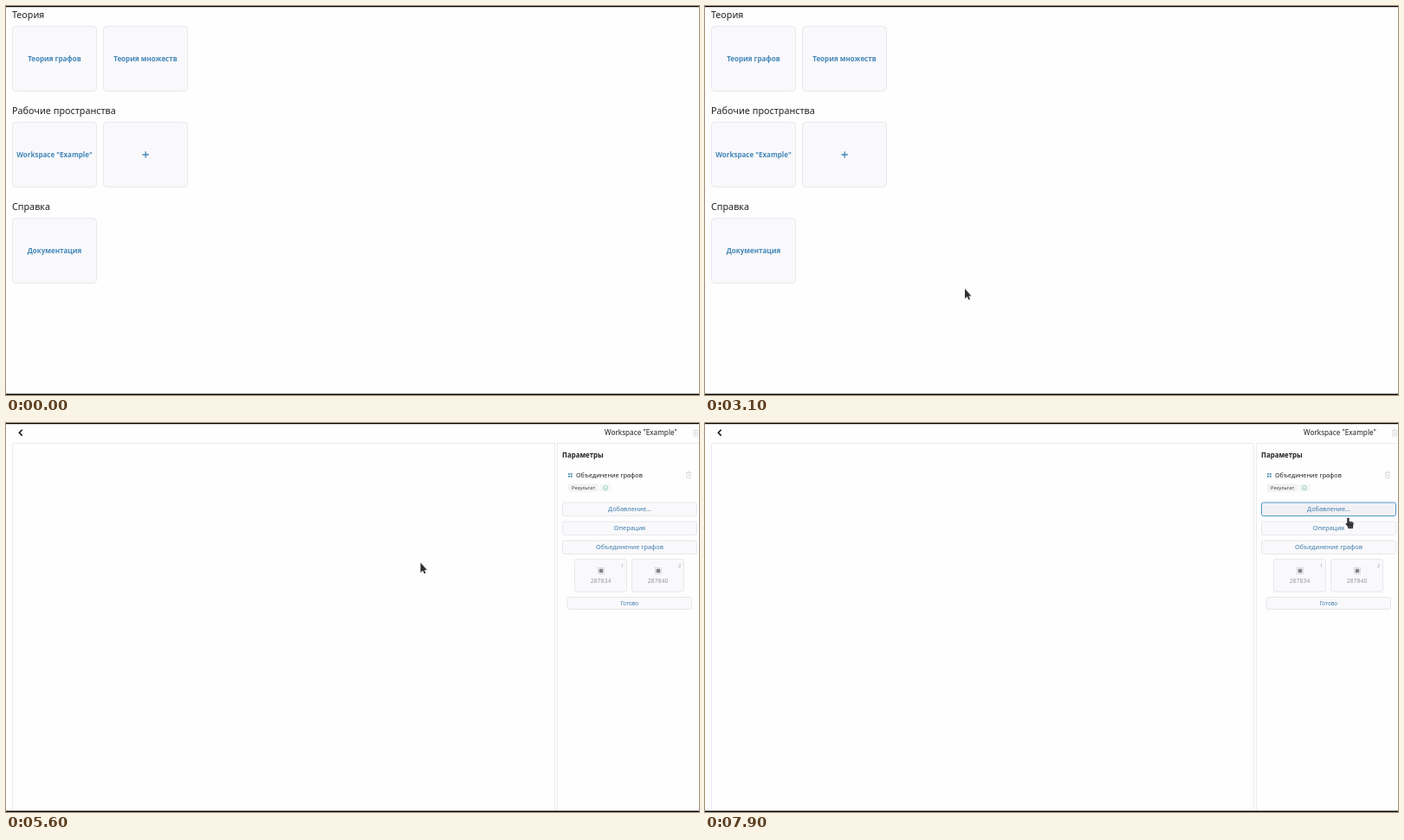
Write an HTML page that moves like this. It is 800 px wide and 450 px high and loops after 8 s.

```html
<!DOCTYPE html>
<html lang="ru">
<head>
<meta charset="utf-8">
<style>
  html, body { margin: 0; width: 100%; height: 100%; overflow: hidden; background: #fff; }
  svg { display: block; width: 800px; height: 450px; }
  text { font-family: "Noto Sans", "Open Sans", sans-serif; fill: #222; }
  .head { font-size: 10.75px; }
  .label { font-size: 8px; font-weight: 700; fill: #4587b8; text-anchor: middle; }
  .btn { font-size: 7.3px; fill: #3f7da9; text-anchor: middle; }
  .num { font-size: 6.9px; fill: #9b9b9f; text-anchor: middle; }
  .box { fill: #f9f9fc; stroke: #e8e8ed; }
  .box.hot { fill: #f1f0f5; stroke: #4f9ac6; }
  .line { fill: none; stroke: #ebebef; }
</style>
</head>
<body>
<svg viewBox="0 0 800 450">
  <rect width="800" height="450" fill="#fefefe"/>
  <g id="home"></g>
  <g id="work"></g>
  <rect width="800" height="1.2"/>
  <rect y="448.6" width="800" height="1.4"/>
  <g id="arrow">
    <path d="M.6 .8V12.2L3.2 9.8L5 13.6L7 12.7L5.2 9H8.6Z" fill="#000" opacity=".15"/>
    <path d="M0 0V11.4L2.6 9L4.3 12.8L6 12L4.3 8.4H7.4Z" fill="#303033" stroke="#fff" stroke-width=".7" paint-order="stroke"/>
  </g>
  <g id="hand">
    <path d="M-1.2 .6Q0 -.8 1.2 .6V4.2L5 5Q6.4 5.4 6.2 7L5.6 10.2V12.4H-.3V10.8L-2.8 7.6Q-3.4 5.6 -1.2 6.6Z" fill="#303033" stroke="#fff" stroke-width=".7" paint-order="stroke"/>
    <path d="M1.6 5.4V7M3.2 5.7V7.1M4.7 6V7.3M.3 10.8H5" stroke="#aaa" stroke-width=".4"/>
  </g>
</svg>
<script>
const LOOP = 8000, STEP = 100, SWITCH = 4700;
const $ = id => document.getElementById(id);
const home = $("home"), work = $("work"), arrow = $("arrow"), hand = $("hand");

function add(parent, tag, attrs, text) {
  const el = document.createElementNS("http://www.w3.org/2000/svg", tag);
  for (const k in attrs) el.setAttribute(k, attrs[k]);
  if (text) el.textContent = text;
  return parent.appendChild(el);
}
const label = (parent, cls, x, y, text, style = "") =>
  add(parent, "text", { class: cls, x, y, style }, text);
const stroke = (parent, d, color, width) =>
  add(parent, "path", { d, fill: "none", stroke: color, "stroke-width": width });

const targets = [];
function box(parent, x, y, width, height, rx) {
  const el = add(parent, "rect", { class: "box", x, y, width, height, rx });
  targets.push({ el, parent, x, y, width, height });
}

function card(x, y, text) {
  box(home, x, y, 97, 75, 4);
  if (text) label(home, "label", x + 48.5, y + 40.7, text);
  else stroke(home, `M${x + 45} ${y + 37.7}h7.4m-3.7 -3.7v7.4`, "#4587b8", 1.3);
}

function button(x, y, width, height, text, size) {
  box(work, x, y, width, height, 2);
  label(work, "btn", x + width / 2, y + height / 2 + 2.6, text, size ? `font-size:${size}px` : "");
}

function tile(x, index, id) {
  box(work, x, 157.5, 60, 37.5, 2);
  label(work, "num", x + 55, 167, index, "font-size:5.5px");
  add(work, "rect", { x: x + 28.2, y: 168.7, width: 4.6, height: 4.6, rx: 1, fill: "#858589" });
  add(work, "rect", { x: x + 27.1, y: 167.6, width: 6.8, height: 6.8, fill: "none",
    stroke: "#aaaaae", "stroke-width": .8, "stroke-dasharray": "1.1 1.1" });
  label(work, "num", x + 30, 185, id);
}

const trash = (x, y) =>
  stroke(work, `M${x} ${y + 1.3}h6.4M${x + 2} ${y + 1}v-1h2.4v1M${x + .8} ${y + 1.5}v6h4.8v-6M${x + 2.4} ${y + 3}v3m1.6 0v-3`, "#d5d5d9", .7);

label(home, "head", 7, 14.2, "Теория");
card(7.5, 23.5, "Теория графов");
card(112.5, 23.5, "Теория множеств");
label(home, "head", 7, 125, "Рабочие пространства");
card(7.5, 134.3, 'Workspace "Example"');
card(112.5, 134.3);
label(home, "head", 7, 236.2, "Справка");
card(7.5, 245.6, "Документация");

stroke(work, "M18.7 7.8L15.3 11.2L18.7 14.6", "#111", 1.5);
label(work, "", 691, 14, 'Workspace "Example"', "font-size:8.2px");
trash(793, 7.6);
add(work, "path", { class: "line", d: "M7.5 448V23.5H633.5V448M636.5 448V23.5H800" });
label(work, "", 642, 39.6, "Параметры", "font-size:7.9px;font-weight:600");
for (const x of [649, 651.8])
  for (const y of [58, 60.8])
    add(work, "rect", { x, y, width: 2, height: 2, rx: .4, fill: "#4f94b8" });
label(work, "", 658, 62.5, "Объединение графов", "font-size:7.2px");
trash(784.8, 56.2);
add(work, "rect", { x: 649, y: 70.5, width: 35, height: 9, rx: 2, fill: "#f2f2f5" });
label(work, "", 653, 77, "Результат", "font-size:5.7px;fill:#444");
add(work, "rect", { x: 685, y: 70.5, width: 14, height: 9, rx: 2, fill: "#f2f8f5" });
add(work, "circle", { cx: 692, cy: 75, r: 2.5, fill: "none", stroke: "#7cc5a0", "stroke-width": .7 });
stroke(work, "M690.8 75.6Q692 77 693.2 75.6M691.1 74.2h.1M692.8 74.2h.1", "#7cc5a0", .5);
button(642.5, 92, 155, 15.5, "Добавление...");
button(642.5, 114, 155, 15.5, "Операция");
button(642.5, 136, 155, 15.5, "Объединение графов");
tile(656.5, "1", "287834");
tile(722.5, "2", "287840");
button(648, 201.5, 143.5, 14, "Готово", 6.2);

// Pointer moves: start, end, destination
const start = [325, 430];
const moves = [
  [0, 900, 300, 327],
  [3800, 4300, 69, 189.5],
  [4700, 5500, 478.5, 161.5],
  [5700, 6300, 172, 164],
  [6300, 6500, 176, 165],
  [7300, 7900, 742.5, 109.5]
];
const ease = p => p * p * (3 - 2 * p);

function pointer(t) {
  let [x, y] = start;
  for (const [from, to, mx, my] of moves) {
    if (t <= from) break;
    const p = ease(Math.min(1, (t - from) / (to - from)));
    x += (mx - x) * p;
    y += (my - y) * p;
  }
  return [x, y];
}

function draw(time) {
  const t = Math.floor(time % LOOP / STEP) * STEP;
  const page = t < SWITCH ? home : work;
  const [x, y] = pointer(t);
  let over = false;
  home.style.display = page === home ? "" : "none";
  work.style.display = page === work ? "" : "none";
  for (const b of targets) {
    const hot = b.parent === page && x >= b.x && x <= b.x + b.width &&
      y >= b.y && y <= b.y + b.height + 2.5;
    b.el.classList.toggle("hot", hot);
    over = over || hot;
  }
  for (const [el, shown] of [[arrow, !over], [hand, over]]) {
    el.style.display = shown && t > 0 ? "" : "none";
    el.setAttribute("transform", `translate(${x} ${y})`);
  }
}

const begin = performance.now();
function frame() {
  draw(performance.now() - begin);
  requestAnimationFrame(frame);
}
frame();
</script>
</body>
</html>
```
